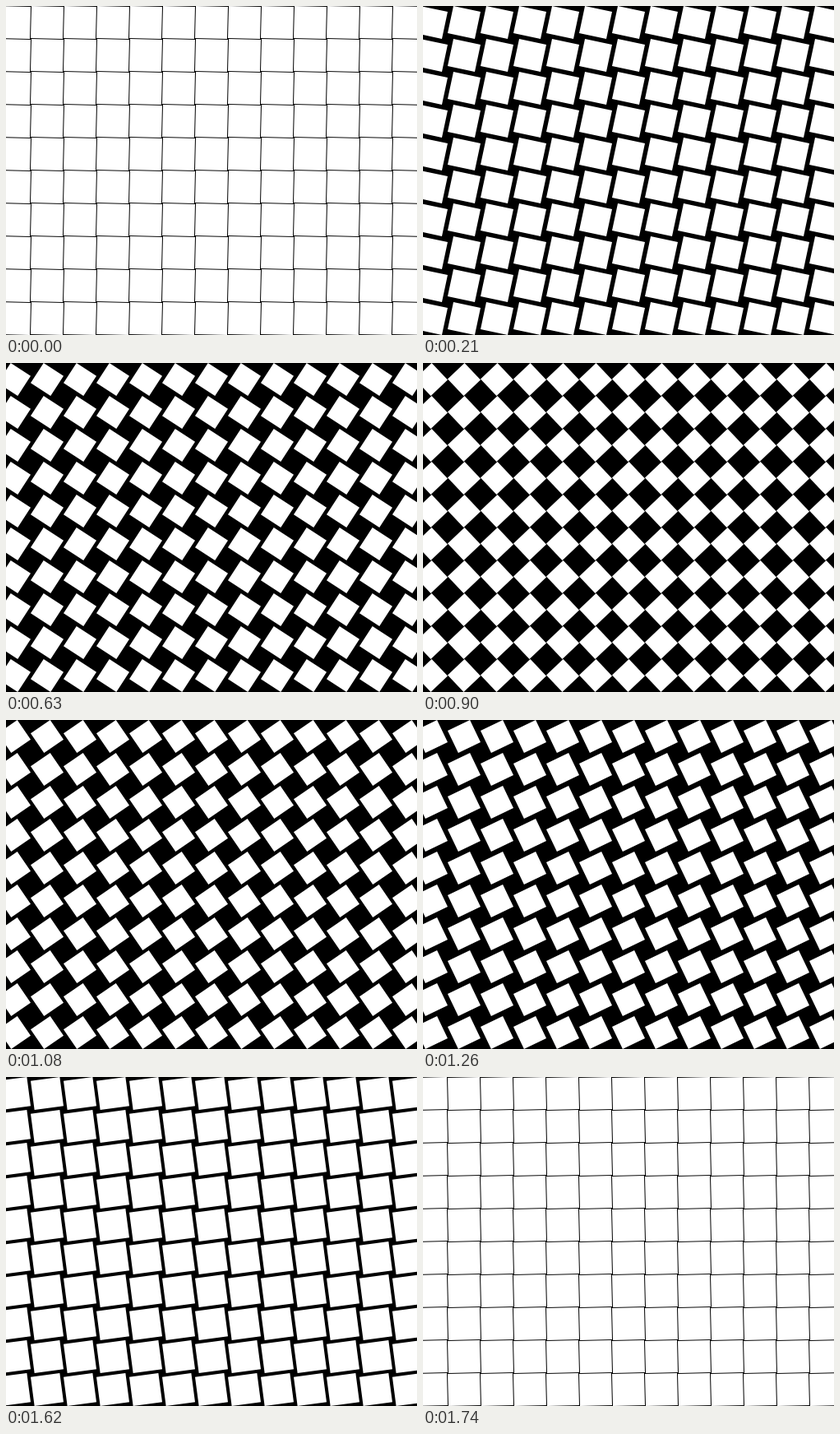
Animation, 500 px wide and 400 px high, one loop 1770 ms. Source, as an HTML page:

```html
<!DOCTYPE html>
<html lang="en">
<head>
<meta charset="utf-8">
<title>Turning squares</title>
<style>
  html, body { margin: 0; width: 100%; height: 100%; overflow: hidden; background: #000; }
  svg { display: block; }
</style>
</head>
<body>
<svg width="500" height="400" viewBox="0 0 500 400">
  <rect width="500" height="400" fill="#000"/>
  <path id="squares" fill="#fff"/>
</svg>
<script>
const CELL = 40, STEP_MS = 30, STEPS = 59, DEGREES_PER_STEP = 1.5;
const squares = document.getElementById('squares');

// A square turned by `angle` whose corners stay on the edges of its cell.
function squarePath(x, y, angle) {
  const s = Math.sin(angle), c = Math.cos(angle);
  const o = CELL * s / (s + c);
  const r = CELL - o;
  return `M${x + o} ${y}L${x + CELL} ${y + o}L${x + r} ${y + CELL}L${x} ${y + r}Z`;
}

function render(ms) {
  const step = Math.floor(ms / STEP_MS) % STEPS;
  const angle = (step + 1) * DEGREES_PER_STEP * Math.PI / 180;
  let d = '';
  for (let y = 0; y < 400; y += CELL)
    for (let x = -10; x < 500; x += CELL) d += squarePath(x, y, angle);
  squares.setAttribute('d', d);
}

function tick() {
  render(performance.now());
  requestAnimationFrame(tick);
}

render(0);
requestAnimationFrame(tick);
</script>
</body>
</html>
```
